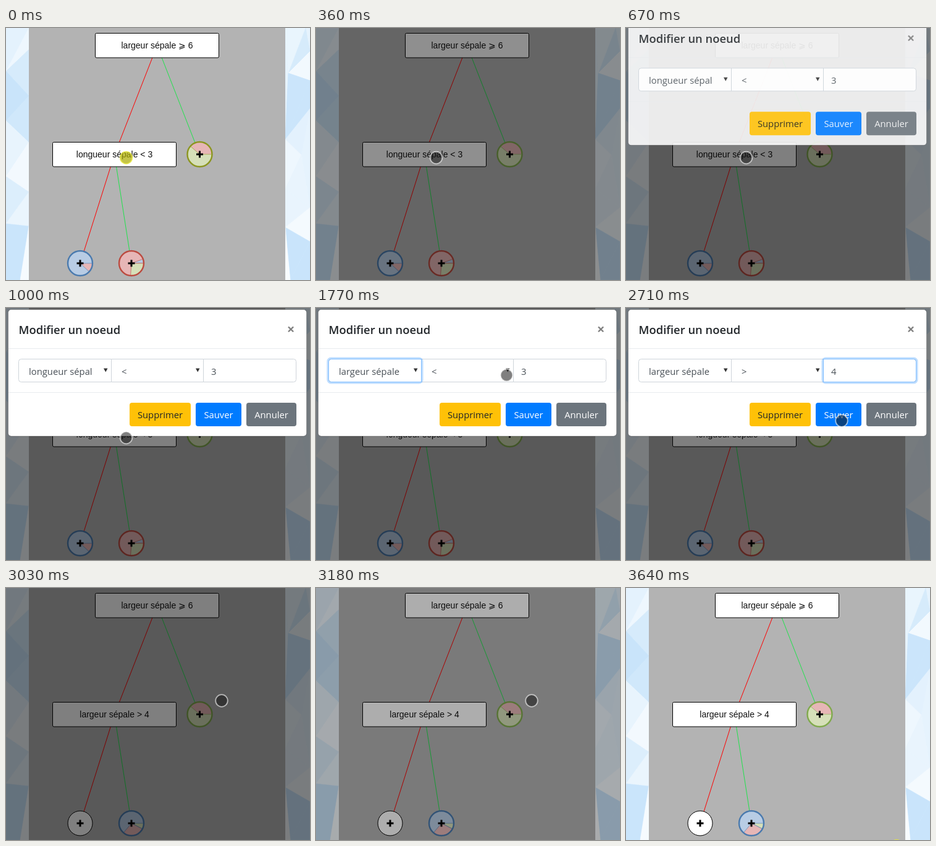
Write an HTML page with a canvas that moves like this. It is 492 px wide and 407 px high and loops after 3.87 s.

```html
<!DOCTYPE html>
<html lang="fr">
<head>
<meta charset="utf-8">
<title>Modifier un noeud</title>
<style>
html, body { margin: 0; width: 100%; height: 100%; overflow: hidden; }
canvas { display: block; }
</style>
</head>
<body>
<canvas id="stage" width="492" height="407"></canvas>
<script>
const W = 492, H = 407, LOOP = 3870;
const ctx = document.getElementById('stage').getContext('2d');
const UI = '"Open Sans", "Noto Sans", sans-serif';
const ARIAL = '"Liberation Sans", Arial, sans-serif';

// The picture is held between these moments.
const STEPS = [0, 200, 360, 520, 670, 830, 1000, 1140, 1300, 1450, 1610, 1770,
  1920, 2080, 2250, 2410, 2550, 2710, 2870, 3030, 3180, 3340, 3500, 3640];

const DIM = [[0, 0], [200, .22], [360, .44], [520, .5], [3030, .5], [3180, .32], [3340, 0]];
const POINTER = [[1000, 194.5, 209.5], [1140, 152, 104], [1300, 150, 140], [1450, 110, 153],
  [1610, 215, 107], [1770, 308.5, 108.5], [1920, 308.5, 108.5], [2080, 300, 199],
  [2250, 270, 270], [2410, 375, 106], [2550, 360, 108], [2710, 349, 182],
  [3340, 349, 182], [3500, 438, 430], [3640, 438, 416.5]];

const FEATURES = ['longueur sépale', 'largeur sépale', 'espèce'];
const OPERATORS = ['', '=', '≠', '<', '⩽', '⩾', '>', '∈', '∉'];

const BLUE = '#b8cce4', RED = '#e6b6b6', GREEN = '#d6e0b9';
const BLUE_EDGE = '#4a7aae', RED_EDGE = '#bb4b40', GREEN_EDGE = '#80aa4c';

const clamp = v => Math.min(1, Math.max(0, v));

function track(keys, t, i = 1) {
  const n = keys.findIndex(k => k[0] > t);
  if (n < 0) return keys[keys.length - 1][i];
  if (n === 0) return keys[0][i];
  const a = keys[n - 1], b = keys[n];
  return a[i] + (b[i] - a[i]) * (t - a[0]) / (b[0] - a[0]);
}

function box(x, y, w, h, r, fill, stroke) {
  ctx.beginPath();
  ctx.roundRect(x, y, w, h, r);
  if (fill) { ctx.fillStyle = fill; ctx.fill(); }
  if (stroke) { ctx.strokeStyle = stroke; ctx.lineWidth = 1; ctx.stroke(); }
}

function text(str, x, y, font, color, align = 'left') {
  ctx.font = font;
  ctx.fillStyle = color;
  ctx.textAlign = align;
  ctx.fillText(str, x, y);
}

function line(x1, y1, x2, y2, color) {
  ctx.beginPath();
  ctx.moveTo(x1, y1);
  ctx.lineTo(x2, y2);
  ctx.strokeStyle = color;
  ctx.lineWidth = 1;
  ctx.stroke();
}

function polygon(points, color) {
  ctx.beginPath();
  points.forEach(p => ctx.lineTo(p[0], p[1]));
  ctx.closePath();
  ctx.fillStyle = ctx.strokeStyle = color;
  ctx.lineWidth = .5;
  ctx.fill();
  ctx.stroke();
}

// Each vertex closes a triangle with the two before it.
function strip(points) {
  for (let i = 2; i < points.length; i++) polygon(points.slice(i - 2, i + 1), points[i][2]);
}

function backdrop() {
  ctx.fillStyle = '#e6f3fd';
  ctx.fillRect(0, 0, W, H);
  strip([[0, 0], [37, 0], [0, 70, '#e4f2fd'], [37, 35, '#eef7fe'], [37, 110, '#d6ebfb'],
    [0, 70, '#d6ebfb'], [0, 150, '#c9e4fa'], [37, 110, '#c9e4fa'], [37, 185, '#d0e8fb'],
    [0, 150, '#d0e8fb'], [0, 240, '#e8f4fd'], [37, 185, '#e8f4fd'], [37, 265, '#f3f9fe'],
    [0, 240, '#f3f9fe'], [0, 316, '#dceefc'], [37, 265, '#dceefc'], [37, 320, '#eaf5fd']]);
  polygon([[0, 316], [37, 320], [23, H], [0, H]], '#cae5fb');
  polygon([[37, 320], [37, H], [23, H]], '#f6fbff');
  strip([[452, 0], [485, 0], [457, 73, '#e9f5fd'], [492, 38, '#d6ebfb'], [492, 85, '#f2f9fe'],
    [457, 73, '#f2f9fe'], [452, 180, '#cbe5fb'], [492, 85, '#cbe5fb'], [492, 130, '#cbe5fb'],
    [452, 180, '#cbe5fb'], [478, 205, '#e3f1fd'], [452, 260, '#eef7fe'], [492, 290, '#e9f4fd'],
    [452, 322, '#e9f4fd'], [492, 345, '#f4fafe'], [460, H, '#c9e4fb'], [492, H, '#c9e4fb']]);
  polygon([[452, 322], [460, H], [452, H]], '#f8fcff');
  ctx.fillStyle = '#b3b3b3';
  ctx.fillRect(37, 0, 415, H);
}

// Slices are [from, to, color] in degrees, clockwise from the right.
function pie(x, y, base, edge, slices) {
  const rad = d => d * Math.PI / 180;
  ctx.beginPath();
  ctx.arc(x, y, 20, 0, 7);
  ctx.fillStyle = base;
  ctx.fill();
  for (const [from, to, color] of slices) {
    ctx.beginPath();
    ctx.moveTo(x, y);
    ctx.arc(x, y, 19.5, rad(from), rad(to));
    ctx.closePath();
    ctx.fillStyle = color;
    ctx.fill();
    for (const a of [from, to]) {
      line(x, y, x + 19 * Math.cos(rad(a)), y + 19 * Math.sin(rad(a)), edge + '99');
    }
  }
  ctx.beginPath();
  ctx.arc(x, y, 20, 0, 7);
  ctx.strokeStyle = edge;
  ctx.lineWidth = slices.length ? 2.4 : 1;
  ctx.stroke();
  ctx.fillStyle = '#000';
  ctx.fillRect(x - 5.5, y - 1.5, 11, 3);
  ctx.fillRect(x - 1.5, y - 5.5, 3, 11);
}

function rule(x, y, label) {
  box(x, y, 200, 39.5, 2, '#fff', '#000');
  text(label, x + 100, y + 24.5, '14px ' + ARIAL, '#111', 'center');
}

function tree(t) {
  const saved = t >= 2870;
  line(244.5, 28.5, 175.5, 204.5, '#f00');
  line(244.5, 28.5, 313.5, 204.5, '#1fe34b');
  line(175.5, 204.5, 120, 380, '#f00');
  line(175.5, 204.5, 203, 380, '#1fe34b');
  rule(144.5, 8.5, 'largeur sépale ⩾ 6');
  rule(75.5, 184.5, saved ? 'largeur sépale > 4' : 'longueur sépale < 3');
  pie(313.5, 204, GREEN, t < 200 ? '#8c9620' : GREEN_EDGE, [[-139, 0, RED]]);
  if (saved) {
    pie(120, 380, '#fff', '#000000', []);
    pie(203, 380, BLUE, BLUE_EDGE, [[0, 27, GREEN], [27, 130, RED]]);
  } else {
    pie(120, 380, BLUE, BLUE_EDGE, [[0, 43, RED]]);
    pie(203, 380, RED, RED_EDGE, [[-20, 0, BLUE], [0, 94, GREEN]]);
  }
}

function field(x, w, radius, value, arrow, glow) {
  box(x, 82.5, w, 37, radius, '#fff', '#ced4da');
  ctx.save();
  ctx.beginPath();
  ctx.rect(x, 83, arrow ? 119.5 : w, 36);
  ctx.clip();
  text(value, x + (arrow ? 16.5 : 12.5), 108, '14.8px ' + UI, '#495057');
  ctx.restore();
  if (arrow) {
    ctx.beginPath();
    ctx.moveTo(x + w - 12.5, 97.5);
    ctx.lineTo(x + w - 6, 97.5);
    ctx.lineTo(x + w - 9.25, 103.5);
    ctx.fillStyle = '#333';
    ctx.fill();
  }
  if (!glow) return;
  ctx.save();
  ctx.globalAlpha *= glow;
  ctx.beginPath();
  ctx.roundRect(x - 1.5, 81, w + 3, 40, radius ? 5 : 2);
  ctx.strokeStyle = 'rgba(0,123,255,.25)';
  ctx.lineWidth = 3;
  ctx.stroke();
  box(x, 82.5, w, 37, radius, null, '#80bdff');
  ctx.restore();
}

function list(x, items, active) {
  const row = 21.3;
  box(x, 121.5, 149, items.length * row + 1, 0, '#fff', '#9a9a9a');
  items.forEach((item, i) => {
    const y = 122 + i * row;
    if (i === active) {
      ctx.fillStyle = '#1e90ff';
      ctx.fillRect(x + .5, y, 148, row);
    }
    text(item, x + 16.5, y + 16, '14.8px ' + UI, i === active ? '#fff' : '#495057');
  });
}

function button(x, w, label, fill, color) {
  box(x, 153, w, 38, 4, fill);
  text(label, x + w / 2, 177.5, '14.8px ' + UI, color, 'center');
}

function dialog(t) {
  if (t < 670 || t >= 3030) return;
  const closing = clamp((t - 2710) / 320);
  const opening = clamp((t - 520) / 480);
  ctx.save();
  ctx.globalAlpha = clamp((t - 520) / 170) * (1 - closing);
  ctx.translate(0, -45 * (1 - opening) ** 2.5 - 24 * closing);

  box(3.5, 2.5, 483, 204.5, 5, '#fff', 'rgba(0,0,0,.25)');
  text('Modifier un noeud', 20.5, 41.5, '600 18.4px ' + UI, '#212529');
  text('×', 461, 42, '700 22px ' + UI, '#808080', 'center');
  line(4, 65.5, 486, 65.5, '#e9ecef');
  line(4, 136.5, 486, 136.5, '#e9ecef');

  const glow = (on, off) => clamp((t - on) / 160 + .5) * (t >= on) * clamp(1 - (t - off + 80) / 160 * (t >= off));
  const first = [20.5, 150, [4, 0, 0, 4], FEATURES[t < 1610 ? 0 : 1], true, glow(1300, 1920)];
  const second = [170.5, 149, 0, t < 2410 ? '<' : '>', true, glow(1920, 2550)];
  const third = [319.5, 150, [0, 4, 4, 0], t < 2550 ? '3' : '4', false, glow(2550, 9999)];
  [first, second, third].sort((a, b) => a[5] - b[5]).forEach(f => field(...f));

  button(200, 99, 'Supprimer', '#ffc107', '#212529');
  button(307, 74, 'Sauver', '#007bff', '#fff');
  button(389, 81, 'Annuler', '#6c757d', '#fff');

  if (t >= 1300 && t < 1610) list(20.5, FEATURES, t < 1450 ? 0 : 1);
  if (t >= 1920 && t < 2410) list(170.5, OPERATORS, t < 2250 ? 3 : 6);
  ctx.restore();
}

function pointer(t) {
  const dark = t >= 200 && t < 3340;
  ctx.beginPath();
  ctx.arc(track(POINTER, t, 1), track(POINTER, t, 2), 9.8, 0, 7);
  ctx.fillStyle = dark ? 'rgba(20,20,20,.54)' : 'rgba(172,172,0,.72)';
  ctx.strokeStyle = dark ? 'rgba(255,255,255,.6)' : 'rgba(232,232,60,.75)';
  ctx.lineWidth = 1.8;
  ctx.fill();
  ctx.stroke();
}

function draw(now) {
  const time = now % LOOP;
  const t = STEPS.filter(s => s <= time).pop();
  backdrop();
  tree(t);
  ctx.fillStyle = `rgba(0,0,0,${track(DIM, t)})`;
  ctx.fillRect(0, 0, W, H);
  dialog(t);
  pointer(t);
}

const start = performance.now();
function tick() {
  draw(performance.now() - start);
  requestAnimationFrame(tick);
}
tick();
</script>
</body>
</html>
```
